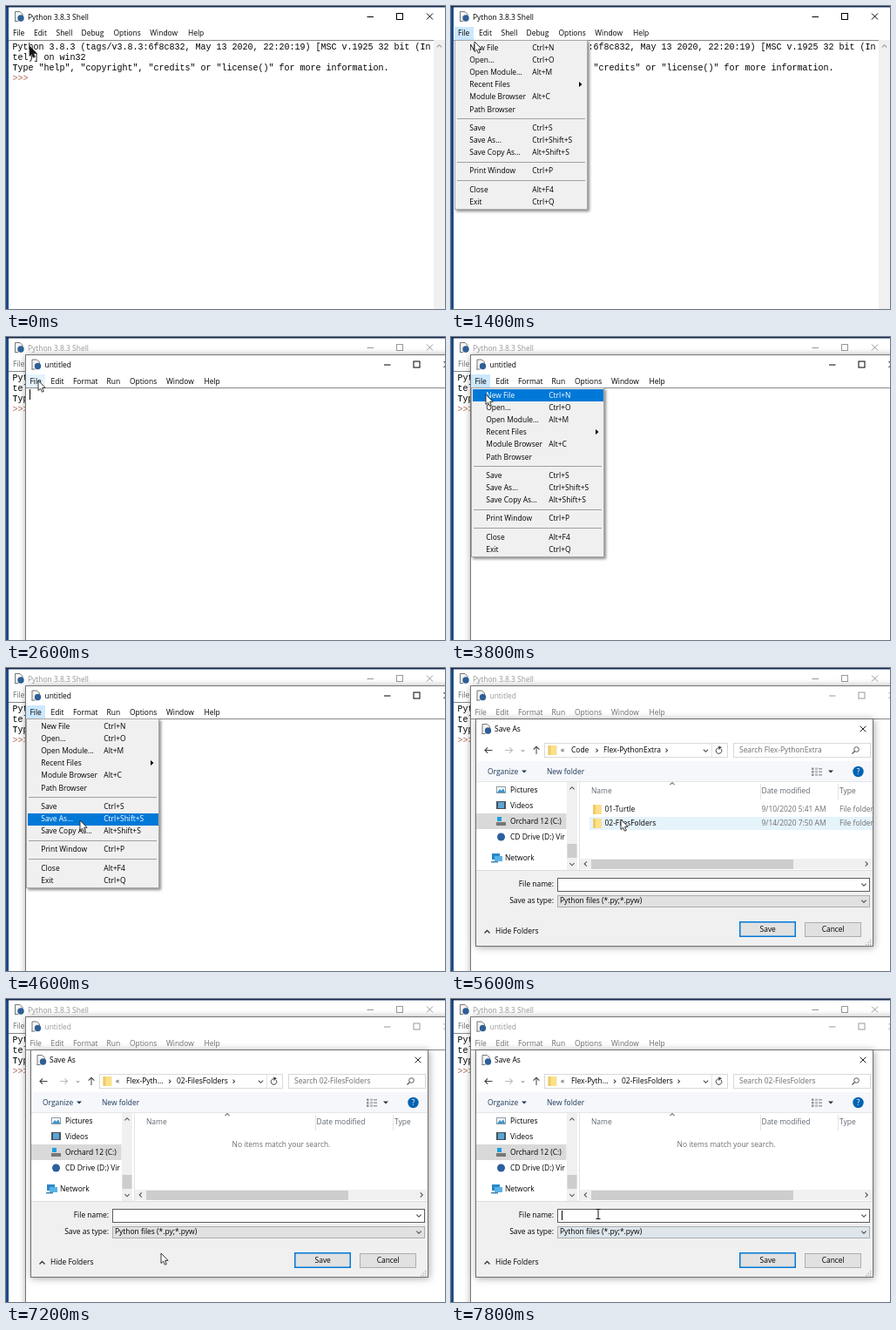
These frames come from a looping animation (504x348 px, 8 s). An HTML page with a canvas:

```html
<!DOCTYPE html>
<html lang="en">
<head>
<meta charset="utf-8">
<title>Saving a new script</title>
<style>
html, body { margin: 0; width: 100%; height: 100%; overflow: hidden; background: #fff; }
canvas { display: block; width: 504px; height: 348px; }
</style>
</head>
<body>
<canvas id="stage" width="504" height="348"></canvas>
<script>
const g = document.getElementById('stage').getContext('2d');
const LOOP = 8000, TICK = 200;
const UI = '500 8.45px "Open Sans", "Noto Sans", sans-serif';
const MONO = '10px "Liberation Mono", "Courier New", monospace';
const INK = '#000', GREY = '#6d6d6d', PALE = '#999', BLUE = '#0078d7';

// Pointer keys: [tick, x, y]
const path = [
  [0, 27, 46], [1, 25, 42], [3, 20, 32], [4, 19, 31], [5, 20, 33], [6, 26, 39], [7, 27, 41],
  [8, 27, 44], [10, 28, 45], [11, 30, 46], [13, 37, 50], [16, 35, 53], [18, 37, 57],
  [19, 40, 66], [21, 50, 92], [22, 68, 155], [23, 85, 175], [26, 86, 175], [27, 140, 176],
  [28, 195, 174], [32, 195, 174], [33, 193, 190], [34, 188, 216], [35, 182, 263],
  [36, 178, 292], [37, 174, 265], [38, 170, 251], [39, 169, 247]
];

function pointer(n) {
  const i = path.findIndex(p => p[0] >= n);
  const b = path[i], a = path[Math.max(0, i - 1)];
  const k = b[0] === a[0] ? 1 : (n - a[0]) / (b[0] - a[0]);
  return [a[1] + (b[1] - a[1]) * k, a[2] + (b[2] - a[2]) * k];
}

function box(x, y, w, h, fill, edge, lw = 1) {
  if (fill) { g.fillStyle = fill; g.fillRect(x, y, w, h); }
  if (edge) {
    g.strokeStyle = edge; g.lineWidth = lw;
    g.strokeRect(x + lw / 2, y + lw / 2, w - lw, h - lw);
  }
}

function shadowBox(x, y, w, h, fill, blur, off, alpha) {
  g.save();
  g.shadowColor = `rgba(0,0,0,${alpha})`;
  g.shadowBlur = blur;
  g.shadowOffsetX = g.shadowOffsetY = off;
  box(x, y, w, h, fill);
  g.restore();
}

// y is the middle of the capitals
function text(s, x, y, color = INK, align = 'left') {
  g.font = UI; g.textAlign = align; g.fillStyle = color;
  g.fillText(s, x, Math.round(y + 2.6));
}

function mono(s, x, y, color = INK) {
  g.font = MONO; g.textAlign = 'left'; g.fillStyle = color;
  g.fillText(s, x, y);
}

function line(pts, color, lw = 1) {
  g.beginPath();
  for (let i = 0; i < pts.length; i += 2) g.lineTo(pts[i], pts[i + 1]);
  g.strokeStyle = color; g.lineWidth = lw; g.stroke();
}

function poly(pts, fill) {
  g.beginPath();
  for (let i = 0; i < pts.length; i += 2) g.lineTo(pts[i], pts[i + 1]);
  g.closePath(); g.fillStyle = fill; g.fill();
}

function disc(x, y, r, fill) {
  g.beginPath(); g.arc(x, y, r, 0, 7); g.fillStyle = fill; g.fill();
}

function chevron(x, y, dx, dy, color = '#555', lw = 1.1) {
  // (dx, dy) points to the tip
  line([x - dx - 2 * dy, y - dy - 2 * dx, x + dx, y + dy, x - dx + 2 * dy, y - dy + 2 * dx], color, lw);
}

function cross(x, y, r, color) {
  line([x - r, y - r, x + r, y + r], color);
  line([x + r, y - r, x - r, y + r], color);
}

function docIcon(x, y) {
  poly([x + 1, y, x + 7, y, x + 10, y + 3, x + 10, y + 12, x + 1, y + 12], '#f4f4f4');
  line([x + 1.5, y + 12, x + 1.5, y + .5, x + 7, y + .5, x + 10, y + 3.5, x + 10, y + 5], '#777');
  line([x + 1, y + 11.5, x + 5, y + 11.5], '#777');
  disc(x + 8, y + 8, 3.7, '#2f5f96');
}

function folder(x, y) {
  box(x, y, 10, 11, '#fbe08c');
  box(x, y, 3, 11, '#efcb66');
}

function controls(x, y, color) {
  line([x - 3.5, y + .5, x + 4, y + .5], color);
  box(x + 30, y - 4, 8, 8, null, color);
  cross(x + 68.5, y, 3.5, color);
}

function menuBar(items, y, color) {
  items.forEach(([s, x]) => text(s, x, y, color));
}

function fileTab(x, y, state) {
  if (state) box(x, y, 22, 15, state === 'open' ? '#cce8ff' : '#e5f3ff');
}

function shell(active, tab) {
  box(0, 0, 504, 348, '#1c4b86');
  box(0, 0, 504, 1.5, '#14294a');
  box(3, 1.5, 501, 347, '#fff');
  docIcon(9, 6);
  text('Python 3.8.3 Shell', 25, 13, active ? INK : PALE);
  controls(418, 12, active ? INK : PALE);
  fileTab(4, 24, tab);
  menuBar([['File', 8], ['Edit', 32], ['Shell', 57.5], ['Debug', 86.5], ['Options', 123.5],
    ['Window', 165.3], ['Help', 209]], 31.5, active ? INK : GREY);
  box(3, 39, 488, 1, '#888');
  box(491, 39, 13, 309, '#f0f0f0');
  chevron(497.5, 46, 0, -1.3, '#999');
  mono('Python 3.8.3 (tags/v3.8.3:6f8c832, May 13 2020, 22:20:19) [MSC v.1925 32 bit (In', 7.5, 50);
  mono('tel)] on win32', 7.5, 62);
  mono('Type "help", "copyright", "credits" or "license()" for more information.', 7.5, 74);
  mono('>>>', 7.5, 86, '#b06a58');
}

function editor(active, tab, caret) {
  shadowBox(22, 20, 500, 350, '#777', 8, 1, .4);
  box(23, 21, 481, 327, '#fff');
  docIcon(28.5, 25.5);
  text('untitled', 44.5, 32, active ? INK : PALE);
  controls(437.5, 31.5, active ? INK : PALE);
  fileTab(23, 43, tab);
  menuBar([['File', 27.5], ['Edit', 51.5], ['Format', 77], ['Run', 115.5], ['Options', 142],
    ['Window', 184], ['Help', 227.5]], 51, active ? INK : GREY);
  box(23, 58, 481, 1, '#888');
  if (caret) box(27, 60, 1, 12, INK);
}

const entries = [
  ['New File', 'Ctrl+N', 9], ['Open...', 'Ctrl+O', 23.2], ['Open Module...', 'Alt+M', 37.4],
  ['Recent Files', '', 51.6], ['Module Browser', 'Alt+C', 65.8], ['Path Browser', '', 80],
  ['Save', 'Ctrl+S', 101.3], ['Save As...', 'Ctrl+Shift+S', 115.6],
  ['Save Copy As...', 'Alt+Shift+S', 129.8], ['Print Window', 'Ctrl+P', 150.7],
  ['Close', 'Alt+F4', 171.9], ['Exit', 'Ctrl+Q', 186]
];

function fileMenu(x, y, alpha, py) {
  g.save();
  g.globalAlpha = alpha;
  shadowBox(x, y, 153, 195, '#f0f0f0', 3, 2, .45);
  box(x, y, 153, 195, '#f0f0f0', '#a8a8a8');
  for (const dy of [90, 140, 161]) box(x + 3, y + dy, 147, 1, '#a0a0a0');
  for (const [name, key, dy] of entries) {
    const cy = y + dy, hot = alpha === 1 && py > cy - 6 && py <= cy + 7.2;
    if (hot) box(x + 2, Math.round(cy - 7), 150, 14, BLUE);
    const c = hot ? '#fff' : INK;
    text(name, x + 17.3, cy, c);
    text(key, x + 89.3, cy, c);
    if (name === 'Recent Files') poly([x + 143, cy - 3.5, x + 146.5, cy - .5, x + 143, cy + 2.5], c);
  }
  g.restore();
}

function tree() {
  g.save();
  g.beginPath(); g.rect(29, 131, 103.5, 101); g.clip();
  box(29, 167, 104, 18, '#d9d9d9');
  text('Pictures', 68, 140);
  text('Videos', 68, 158);
  text('Orchard 12 (C:)', 68, 176);
  text('CD Drive (D:) Vir', 68, 194);
  text('Network', 62, 218);
  box(52, 136, 11, 8, '#fff', '#8a9aa6');
  poly([53, 143, 56, 139, 58, 141, 60, 138, 62, 143], '#3b95c9');
  box(52, 153, 11, 9, '#4a4f58');
  box(54, 154, 7, 7, '#5aa5d6');
  box(52, 177, 11, 4, '#777');
  box(53, 171, 5, 5, '#1aa0e0');
  disc(57.5, 194, 4.5, '#2c5f9e');
  box(47, 213, 9, 7, '#2b87c8');
  box(50, 216, 9, 6, '#58b1e4');
  box(46, 222, 8, 1.5, '#4b83a8');
  g.restore();
  box(133, 131, 12, 101, '#f0f0f0');
  box(133.5, 202, 11, 16, '#cdcdcd');
  chevron(139, 138, 0, -1.3);
  chevron(139, 225.5, 0, 1.3);
  box(147, 131, 1, 101, '#e2e2e2');
}

function files(inside, rowFill) {
  const head = '#5f6670';
  text('Name', 161, 141, head);
  text('Date modified', 356.5, 141, head);
  text('Type', 446, 141, head);
  chevron(254, 132.8, 0, -1.3, '#777');
  for (const x of [355, 444]) box(x, 133, 1, 18, '#e3e3e3');
  if (inside) {
    text('No items match your search.', 316, 167, GREY, 'center');
  } else {
    if (rowFill) box(159, 171, 325, 15, rowFill);
    [['01-Turtle', '9/10/2020 5:41 AM', 162], ['02-FilesFolders', '9/14/2020 7:50 AM', 178]]
      .forEach(([name, date, y]) => {
        folder(163, y - 5);
        text(name, 176.5, y);
        text(date, 356.5, y, GREY);
        text('File folder', 446, y, GREY);
      });
  }
  box(148, 219, 336, 12, '#f0f0f0');
  box(161, 220, 232, 11, '#cdcdcd');
  chevron(154.5, 225, -1.3, 0);
  chevron(477, 225, 1.3, 0);
}

function address(inside) {
  line([47.5, 94.5, 39, 94.5], '#444');
  chevron(40.5, 94.5, -1.6, 0, '#444');
  line([62, 94.5, 70.5, 94.5], '#bbb');
  chevron(69, 94.5, 1.6, 0, '#bbb');
  chevron(82.5, 95, 0, .8, '#999');
  line([98, 99, 98, 90], '#444');
  chevron(98, 92, 0, -1.7, '#444');

  box(107, 86, 211, 17, '#fff', '#d9d9d9');
  folder(111.5, 89);
  text('«', 126, 94.5, '#333');
  const crumbs = inside ? ['Flex-Pyth...', '02-FilesFolders'] : ['Code', 'Flex-PythonExtra'];
  const at = inside ? [138, 188, 196, 261.5] : [138, 167.5, 175, 247.5];
  crumbs.forEach((s, i) => {
    text(s, at[i * 2], 94.5);
    chevron(at[i * 2 + 1], 94.7, 1, 0, '#444');
  });
  chevron(292.5, 95, 0, 1.3, '#444');
  box(299, 87, 1, 15, '#e3e3e3');
  g.beginPath(); g.arc(307.5, 95, 3.3, -.6, 4.6);
  g.strokeStyle = '#444'; g.lineWidth = 1; g.stroke();
  poly([307, 89.5, 311, 91, 307.5, 94], '#444');

  box(324, 86, 158, 17, '#fff', '#d9d9d9');
  text('Search ' + crumbs[1], 331, 94.5, GREY);
  g.beginPath(); g.arc(465.5, 93.5, 2.8, 0, 7);
  g.strokeStyle = '#555'; g.stroke();
  line([463.5, 95.5, 460.5, 98.5], '#555', 1.3);
}

function toolbar() {
  box(29, 107, 455, 24, '#f5f7fa');
  box(29, 130, 455, 1, '#e4e6e8');
  text('Organize', 42, 119, '#1e395b');
  poly([81, 117.5, 87, 117.5, 84, 120.5], '#1e395b');
  text('New folder', 110, 119, '#1e395b');
  for (let r = 0; r < 3; r++) {
    box(414, 114.5 + r * 3.5, 2.5, 2.5, '#8d949b');
    box(418, 114.5 + r * 3.5, 3, 2.5, '#b5bac0');
    box(422, 115 + r * 3.5, 4, 1.5, '#9aa0a6');
  }
  poly([433, 117.5, 439, 117.5, 436, 120.5], '#333');
  disc(467.5, 119, 6.2, '#0063b1');
  text('?', 467.5, 119, '#fff', 'center');
}

function form(caret, tint) {
  box(29, 233, 455, 86, '#f0f0f0');
  box(29, 232, 455, 1, '#dcdcdc');
  text('File name:', 118, 248.7, INK, 'right');
  box(122, 241, 359, 16, '#fff', '#5c5c5c');
  chevron(474, 249, 0, 1.3, '#444');
  if (caret) box(127, 243, 1, 11, INK);
  text('Save as type:', 118, 267.7, INK, 'right');
  box(122, 261, 359, 14, tint || '#e1e1e1', tint === '#e5f1fb' ? BLUE : '#adadad');
  chevron(474, 268, 0, 1.3, '#444');
  text('Python files (*.py;*.pyw)', 125, 267.7);
  chevron(41.5, 303, 0, -1.5, '#333', 1.3);
  text('Hide Folders', 51, 302.5);
  box(331, 291, 65, 18, '#e1e1e1', BLUE, 1.5);
  text('Save', 363.7, 300, INK, 'center');
  box(406, 292, 65, 17, '#e1e1e1', '#adadad');
  text('Cancel', 438.7, 300, INK, 'center');
  for (let r = 0; r < 3; r++)
    for (let c = 0; c <= r; c++) box(481 - c * 2.5, 312 + r * 2.5, 1.3, 1.3, '#aaa');
}

function dialog(n, px, py) {
  const inside = n >= 31;
  const rowFill = n === 30 ? '#cce8ff' : n >= 28 ? '#e5f3fb' : null;
  const hover = n > 32 && py > 260 && py < 276;
  const tint = hover ? '#e5f1fb' : n > 37 ? '#dee6ec' : null;
  shadowBox(28, 58, 457, 262, '#6f6f6f', 8, 1, .35);
  box(29, 59, 455, 260, '#fff');
  g.save();
  g.beginPath(); g.rect(29, 59, 455, 260); g.clip();
  docIcon(34.5, 64);
  text('Save As', 50, 70);
  cross(473, 70, 3.3, '#222');
  address(inside);
  toolbar();
  tree();
  files(inside, rowFill);
  form(n === 39, tint);
  g.restore();
}

function arrow(x, y, dark) {
  g.save();
  g.translate(x, y);
  g.beginPath();
  [[0, 0], [0, 11.5], [2.6, 9.2], [4.4, 13.2], [6.3, 12.4], [4.6, 8.5], [8.1, 8.3]]
    .forEach(p => g.lineTo(...p));
  g.closePath();
  g.fillStyle = dark ? '#111' : '#fff'; g.fill();
  g.strokeStyle = dark ? '#333' : '#222'; g.lineWidth = .9; g.stroke();
  g.restore();
}

function beam(x, y) {
  line([x, y - 5, x, y + 5], '#111');
  line([x - 2.5, y - 5.5, x + 2.5, y - 5.5], '#111');
  line([x - 2.5, y + 5.5, x + 2.5, y + 5.5], '#111');
}

function draw(n) {
  const [px, py] = pointer(n);
  const newMenu = n >= 5 && n < 10, saveMenu = n >= 16 && n < 26;
  shell(n < 11, newMenu ? 'open' : n > 1 && n < 5 ? 'hover' : null);
  if (newMenu) fileMenu(4, 39, Math.min(1, (n - 4) * .4), py);
  if (n >= 11) {
    const tab = saveMenu ? 'open' : n > 11 && n < 16 ? 'hover' : null;
    editor(n < 27, tab, n < 27 && n % 5 !== 0);
  }
  if (saveMenu) fileMenu(23, 58, Math.min(1, (n - 15) * .5), py);
  if (n >= 27) dialog(n, px, py);
  if (n >= 38) beam(px, py);
  else arrow(px, py, n < 2);
}

let last = -1;
function frame() {
  const n = Math.floor(performance.now() % LOOP / TICK);
  if (n !== last) draw(last = n);
  requestAnimationFrame(frame);
}
frame();
</script>
</body>
</html>
```
